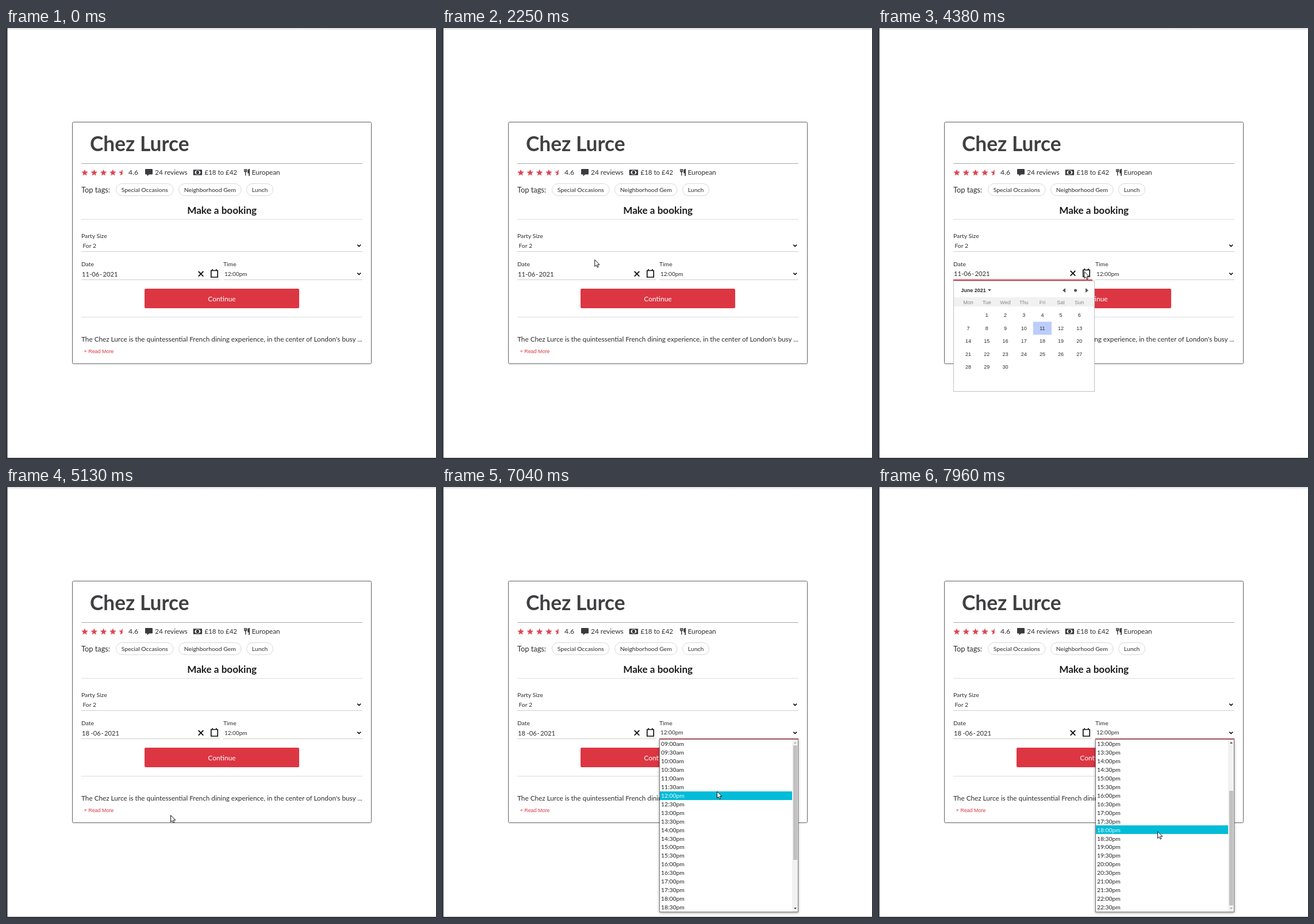
An HTML page that plays this animation: 748x749 px, repeating every 8000 ms.

```html
<!DOCTYPE html>
<html lang="en">
<head>
<meta charset="utf-8">
<title>Make a booking</title>
<style>
  html, body { margin: 0; width: 100%; height: 100%; overflow: hidden; background: #fff; }
  svg { display: block; width: 100vw; height: 100vh; }
  text { font-family: Lato, "Open Sans", sans-serif; fill: #2d2d31; }
  .mid { text-anchor: middle; }
  .popup { filter: drop-shadow(0 1px 2px rgba(0, 0, 0, .4)); }
  .cal text { font-family: "Liberation Sans", Arial, sans-serif; font-size: 9px; text-anchor: middle; }
</style>
</head>
<body>
<svg id="stage" viewBox="0 0 748 749" xmlns="http://www.w3.org/2000/svg">
  <defs>
    <linearGradient id="shade" x2="0" y2="1">
      <stop offset="0" stop-color="#d8d8d8"/><stop offset="1" stop-color="#fff"/>
    </linearGradient>
    <clipPath id="half"><rect x="190" y="240" width="12.6" height="20"/></clipPath>
    <clipPath id="listClip"><rect x="378" y="439" width="242" height="299"/></clipPath>
  </defs>
  <rect width="748" height="749" fill="#fff"/>
  <rect width="748" height="4" fill="url(#shade)"/>
  <path d="M0 0H2.5V747H748V749H0Z" fill="#2f3439"/>
  <rect x="115.5" y="163.5" width="520" height="420" rx="2" fill="#fff" stroke="#5f5f63"/>
  <g id="page"></g>
  <g id="calendar" class="cal"></g>
  <g id="party" class="popup"></g>
  <g id="times" class="popup"></g>
  <path id="cursor" d="M0 0V11.8L2.7 9.3L4.5 13.3L6.4 12.5L4.7 8.5H8.3Z" fill="#fff" stroke="#111" stroke-width="1" stroke-linejoin="round"/>
</svg>
<script>
const LOOP = 8000, RED = '#dc3643', INK = '#3b3b3f', CYAN = '#02bcd8';
const $ = id => document.getElementById(id);

function add(parent, tag, attrs, content) {
  const el = document.createElementNS('http://www.w3.org/2000/svg', tag);
  for (const key in attrs) el.setAttribute(key, attrs[key]);
  if (content !== undefined) el.textContent = content;
  parent.appendChild(el);
  return el;
}
const set = (el, attrs) => { for (const key in attrs) el.setAttribute(key, attrs[key]); };
const show = (el, on) => el.setAttribute('visibility', on ? 'visible' : 'hidden');
const label = (parent, x, y, size, str, more) =>
  add(parent, 'text', { x, y, 'font-size': size, ...more }, str);
const box = (parent, x, y, width, height, fill, more) =>
  add(parent, 'rect', { x, y, width, height, fill, ...more });

const page = $('page');

// Heading and rating row
label(page, 146, 214, 35.3, 'Chez Lurce', { 'font-weight': 700, style: 'fill:#404043' });
box(page, 131, 235, 489, 1, '#a9a9ab');

function star(cx, cy, r) {
  let d = '';
  for (let i = 0; i < 10; i++) {
    const a = Math.PI * (i / 5 - .5), q = i % 2 ? r * .42 : r;
    d += (i ? 'L' : 'M') + (cx + q * Math.cos(a)).toFixed(2) + ' ' + (cy + q * Math.sin(a)).toFixed(2);
  }
  return d + 'Z';
}
for (let i = 0; i < 5; i++) {
  const el = add(page, 'path', { d: star(137 + 16.3 * i, 251.6, 6.2), fill: '#db4552' });
  if (i === 4) el.setAttribute('clip-path', 'url(#half)');
}
label(page, 213, 255, 12.2, '4.6');
label(page, 259, 255, 11.9, '24 reviews');
label(page, 345.5, 255, 11.5, '£18 to £42');
label(page, 427.5, 255, 11.8, 'European');

add(page, 'path', { d: 'M243 245H254Q255 245 255 246V253.500Q255 254.500 254 254.500H249L245.500 257.500V254.500H243Q242 254.500 242 253.500V246Q242 245 243 245Z', fill: INK });
box(page, 325.7, 246.3, 15.4, 9.4, INK, { rx: .6 });
add(page, 'ellipse', { cx: 333.4, cy: 251, rx: 5, ry: 3.7, fill: '#fff' });
add(page, 'ellipse', { cx: 333.4, cy: 251, rx: 2.6, ry: 3.2, fill: INK });
add(page, 'path', { d: 'M414.700 245V248.500Q414.700 250 416.700 250Q418.700 250 418.700 248.500V245M416.700 245V256.500', fill: 'none', stroke: INK, 'stroke-width': 1.4 });
add(page, 'path', { d: 'M424 244.800V257H422.200V252.500H420.300V248.200Q420.500 245 424 244.800Z', fill: INK });

// Tags
label(page, 131, 286, 12.8, 'Top tags:');
[[191.5, 99.5, 'Special Occasions'], [300.5, 108.5, 'Neighborhood Gem'], [418.5, 46, 'Lunch']].forEach(([x, w, str]) => {
  box(page, x, 270.5, w, 21, '#fff', { rx: 10.5, stroke: '#d9d9db' });
  label(page, x + w / 2, 284.6, 10.4, str, { class: 'mid' });
});

// Booking form
label(page, 375.7, 323, 17.1, 'Make a booking', { class: 'mid', 'font-weight': 700, style: 'fill:#1b1b1e' });
box(page, 131, 332, 489, 1, '#dcdcde');
label(page, 131, 365, 10.4, 'Party Size');
label(page, 131, 414, 10.4, 'Date');
label(page, 378, 414, 10.4, 'Time');

function field(x, y, w) {
  const line = box(page, x, y, w, 1, '#cfcfd1');
  const body = add(page, 'g', {});
  return {
    body,
    hover(on) {
      set(line, on ? { height: 2, fill: RED } : { height: 1, fill: '#cfcfd1' });
      body.setAttribute('transform', on ? 'translate(0 -1)' : '');
    }
  };
}
const chevron = y => add(page, 'path', { d: `M611.300 ${y - 1.5}L614.200 ${y + 1.4}L617.100 ${y - 1.5}`, fill: 'none', stroke: '#111', 'stroke-width': 1.7 });

const partyField = field(131, 388, 489);
label(partyField.body, 133.5, 382, 10.3, 'For 2');
chevron(378.2);

const dateField = field(131, 437, 242);
const dateParts = [132, 145, 149.2, 163, 168.5].map(x => ({
  x, el: label(dateField.body, x, 431.5, 11.2, '-')
}));
dateParts[2].el.textContent = '06';
dateParts[4].el.textContent = '2021';
add(dateField.body, 'path', { d: 'M334.700 423L343.300 431.600M343.300 423L334.700 431.600', stroke: '#111', 'stroke-width': 1.8 });
add(dateField.body, 'path', { d: 'M356.800 421.500H368.200V433H356.800ZM359.200 419V422M365.800 419V422', fill: 'none', stroke: '#111', 'stroke-width': 1.7 });

const timeField = field(378, 437, 242);
label(timeField.body, 380, 431, 10, '12:00pm');
chevron(427.2);

function setDay(day) {
  dateParts[0].el.textContent = day;
  const shift = day === '18' ? 2.6 : 0;
  dateParts.forEach((p, i) => p.el.setAttribute('x', p.x + (i ? shift : 0)));
}

box(page, 241, 453, 269, 34, RED, { rx: 2 });
label(page, 375.5, 475, 12, 'Continue', { class: 'mid', style: 'fill:#fff' });
box(page, 131, 502, 489, 1, '#dcdcde');
label(page, 131, 544.5, 11.78, "The Chez Lurce is the quintessential French dining experience, in the center of London's busy ...");
label(page, 135.5, 565, 8.93, '+ Read More', { style: `fill:${RED};font-family:"Liberation Sans",Arial,sans-serif` });

// Calendar popup, weeks start on Monday
const cal = $('calendar'), CELL_W = 32.2, CELL_H = 22.5, CAL_X = 141, CAL_Y = 488;
box(cal, 131.5, 439.5, 245, 192, '#fff', { stroke: '#bfbfbf' });
label(cal, 166, 459, 9, 'June 2021', { 'font-weight': 700 });
add(cal, 'path', { d: 'M191 454H197L194 457.500ZM326 452V460L321 456ZM361 452V460L366 456Z', fill: '#555' });
add(cal, 'circle', { cx: 343.5, cy: 456, r: 2.5, fill: '#555' });
box(cal, 132, 468, 244, 16, '#f1f1f1');
['Mon', 'Tue', 'Wed', 'Thu', 'Fri', 'Sat', 'Sun'].forEach((d, i) =>
  label(cal, CAL_X + (i + .5) * CELL_W, 479.5, 9, d, { style: 'fill:#888' }));
const hoverCell = box(cal, 0, 0, CELL_W, CELL_H, '#dfe7fd');
box(cal, CAL_X + 4 * CELL_W, CAL_Y + CELL_H, CELL_W, CELL_H, '#bccdfc');
for (let d = 1; d <= 30; d++) {
  label(cal, CAL_X + (d % 7 + .5) * CELL_W, CAL_Y + (Math.floor(d / 7) + .5) * CELL_H + 3.2, 9, d);
}

// Party size popup
const party = $('party');
box(party, 131.5, 389.5, 488, 19, '#fff', { stroke: '#77777a' });
box(party, 132, 390, 487, 18, CYAN);
label(party, 134.5, 402.5, 10.3, 'For 2', { style: 'fill:#fff' });

// Time popup
const times = $('times'), ROW = 14.94, TOP = 439, MAX_SCROLL = 8 * ROW;
box(times, 378.5, 438.5, 241, 300, '#fff', { stroke: '#77777a' });
const clip = add(times, 'g', { 'clip-path': 'url(#listClip)' });
const list = add(clip, 'g', {});
const bar = box(clip, 379, TOP, 230, 15, CYAN);
clip.insertBefore(bar, list);
const rows = Array.from({ length: 28 }, (_, i) => {
  const hour = 9 + (i >> 1);
  const str = String(hour).padStart(2, '0') + (i % 2 ? ':30' : ':00') + (hour < 12 ? 'am' : 'pm');
  return label(list, 381, TOP + i * ROW + 11.2, 10.3, str);
});
box(times, 609, 439, 10, 299, '#f1f1f1');
const thumb = box(times, 611, 449, 7, 199, '#c1c1c1');
const upArrow = add(times, 'path', { d: 'M612 445.800H617L614.500 443Z' });
const downArrow = add(times, 'path', { d: 'M612 731H617L614.500 733.800Z' });

// Cursor keys: time, x, y
const PATH = [
  [790, 649, 338], [920, 560, 372], [1250, 560, 372], [1380, 440, 269.5],
  [1630, 440, 269.5], [2250, 265.7, 402.7], [2420, 265.7, 402.7], [2830, 262, 374.5],
  [3380, 262, 374.5], [3630, 258.5, 429.5], [3920, 258.5, 429.5], [4260, 361, 417],
  [4340, 361, 420], [4760, 285, 545], [4900, 285, 547], [5130, 286.5, 570.5],
  [5540, 511, 442], [5580, 514, 438.5], [5960, 514, 438.5], [6150, 498.5, 428.7],
  [6880, 498.5, 428.7], [7040, 478.5, 529], [7130, 478.5, 529], [7210, 480, 556],
  [7460, 480, 556], [7680, 486.5, 598.7], [8000, 486.5, 598.7]
];
const smooth = u => u * u * (3 - 2 * u);
const progress = (t, a, b) => smooth(Math.min(1, Math.max(0, (t - a) / (b - a))));

function cursorAt(t) {
  let i = 0;
  while (i < PATH.length - 2 && t >= PATH[i + 1][0]) i++;
  const [a, x0, y0] = PATH[i], [b, x1, y1] = PATH[i + 1], u = progress(t, a, b);
  return [x0 + (x1 - x0) * u, y0 + (y1 - y0) * u];
}

function draw(t) {
  const [x, y] = cursorAt(t), active = t >= 790;
  const over = (l, r, top, bottom) => active && x >= l && x <= r && y >= top && y <= bottom;
  const partyOpen = t >= 3080 && t < 3380, calOpen = t >= 4300 && t < 4850, timesOpen = t >= 6200;

  show($('cursor'), active);
  $('cursor').setAttribute('transform', `translate(${x} ${y})`);
  partyField.hover(over(131, 620, 366, 389));
  dateField.hover(calOpen || over(131, 373, 415, 437));
  timeField.hover(timesOpen || over(378, 620, 415, 437));
  setDay(t < 4850 ? '11' : '18');

  show(party, partyOpen);
  party.setAttribute('opacity', t < 3160 ? .6 : 1);

  show(cal, calOpen);
  const col = Math.floor((x - CAL_X) / CELL_W), week = Math.floor((y - CAL_Y) / CELL_H);
  show(hoverCell, calOpen && week >= 0 && col >= 0 && col < 7);
  set(hoverCell, { x: CAL_X + col * CELL_W, y: CAL_Y + week * CELL_H });

  show(times, timesOpen);
  const scroll = MAX_SCROLL * progress(t, 7620, 7950);
  const picked = y < TOP ? 6 : Math.floor((y - TOP + scroll) / ROW);
  list.setAttribute('transform', `translate(0 ${-scroll})`);
  bar.setAttribute('y', Math.round(TOP + picked * ROW - scroll));
  rows.forEach((el, i) => { el.style.fill = i === picked ? '#e4f8fb' : '#222225'; });
  thumb.setAttribute('y', 449 + 79 * scroll / MAX_SCROLL);
  upArrow.setAttribute('fill', scroll > 0 ? '#444' : '#a8a8a8');
  downArrow.setAttribute('fill', scroll < MAX_SCROLL ? '#444' : '#a8a8a8');
}

const start = performance.now();
function tick() {
  draw((performance.now() - start) % LOOP);
  requestAnimationFrame(tick);
}
tick();
</script>
</body>
</html>
```
